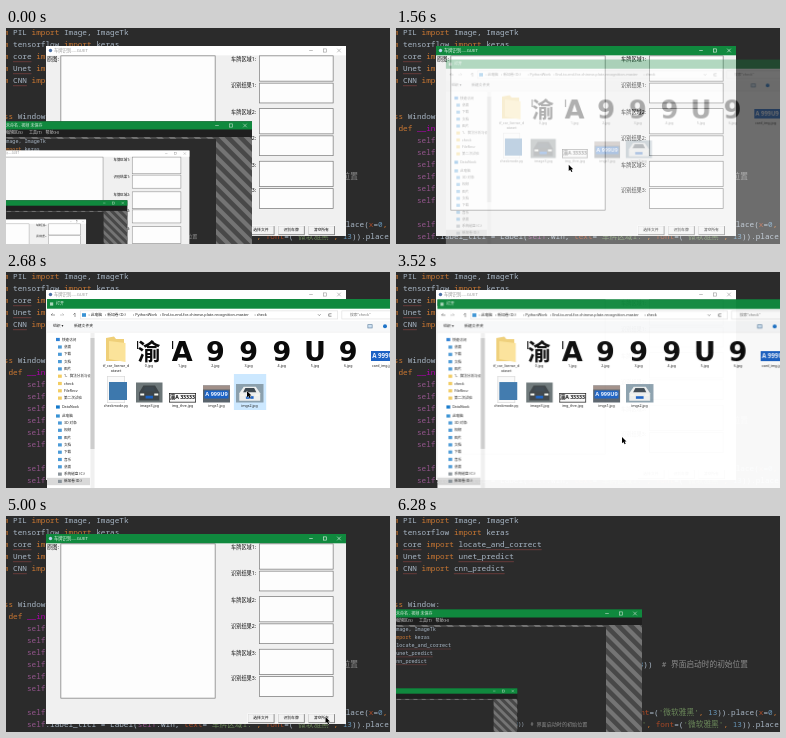
Animation, 384 px wide and 216 px high, one loop 6360 ms. Source, as an HTML page with a canvas:

```html
<!DOCTYPE html>
<html lang="zh">
<head>
<meta charset="utf-8">
<style>
html, body { margin: 0; width: 100%; height: 100%; overflow: hidden; background: #2b2b2b; }
canvas { display: block; width: 384px; height: 216px; }
</style>
</head>
<body>
<canvas id="stage" width="384" height="216"></canvas>
<script>
const LOOP = 6360;
const GREEN = '#10893e';
const UI = '"Noto Sans", "Noto Sans CJK SC", "Noto Sans CJK", sans-serif';
const MONO = '"Noto Sans Mono", "Noto Sans CJK SC", "Noto Sans CJK", monospace';
const GLYPH = '"DejaVu Sans", "Noto Sans CJK SC", "Noto Sans CJK", sans-serif';
let g = document.getElementById('stage').getContext('2d');

const clamp = v => Math.max(0, Math.min(1, v));
const easeOut = p => 1 - (1 - p) * (1 - p);
const easeIO = p => p * p * (3 - 2 * p);

function rect(x, y, w, h, color) {
  g.fillStyle = color;
  g.fillRect(x, y, w, h);
}
function box(x, y, w, h, fill, edge) {
  rect(x, y, w, h, edge);
  rect(x + 0.7, y + 0.7, w - 1.4, h - 1.4, fill);
}
function text(s, x, y, size, color, opt = {}) {
  g.font = `${opt.weight || 400} ${size}px ${opt.font || UI}`;
  g.textAlign = opt.align || 'left';
  g.textBaseline = opt.base || 'middle';
  g.fillStyle = color;
  g.fillText(s, x, y);
}
function line(points, color, width = 0.7) {
  g.strokeStyle = color;
  g.lineWidth = width;
  g.beginPath();
  points.forEach(([x, y], i) => i ? g.lineTo(x, y) : g.moveTo(x, y));
  g.stroke();
}
function poly(points, color) {
  g.fillStyle = color;
  g.beginPath();
  points.forEach(([x, y]) => g.lineTo(x, y));
  g.fill();
}
function dot(x, y, r, color) {
  g.fillStyle = color;
  g.beginPath();
  g.arc(x, y, r, 0, 7);
  g.fill();
}
function clipped(x, y, w, h, draw) {
  g.save();
  g.beginPath();
  g.rect(x, y, w, h);
  g.clip();
  draw();
  g.restore();
}

// Draws a window with opacity a, slightly shrunk around (cx, cy) while it fades.
function fade(a, cx, cy, draw) {
  if (a <= 0) return;
  if (a >= 1) return draw();
  const layer = document.createElement('canvas');
  layer.width = 410;
  layer.height = 240;
  const outer = g;
  g = layer.getContext('2d');
  draw();
  g = outer;
  const k = 0.93 + 0.07 * a;
  g.save();
  g.globalAlpha *= a;
  g.translate(cx, cy);
  g.scale(k, k);
  g.drawImage(layer, -cx, -cy);
  g.restore();
}

/* ---- editor ---- */

const INK = { w: '#a9b7c6', k: '#cc7832', s: '#94558d', m: '#b200b2', a: '#aa4926',
              t: '#6a8759', n: '#6897bb', c: '#8c8c8c' };
const CH = 4.62, SIZE = 7.7;
const label = (name, caption) =>
  `\`sself\`w.${name} = Label(\`sself\`w.win, \`atext\`w=\`t'${caption}'\`k, ` +
  `\`afont\`w=(\`t'微软雅黑'\`k, \`n13\`w)).place(\`ax\`w=\`n0\`k, `;
const CODE = [
  [0, 0, '`kfrom `wPIL `kimport `wImage, ImageTk'],
  [1, 0, '`kfrom `wtensorflow `kimport `wkeras'],
  [2, 0, '`kfrom `wcore `kimport `wlocate_and_correct'],
  [3, 0, '`kfrom `wUnet `kimport `wunet_predict'],
  [4, 0, '`kfrom `wCNN `kimport `wcnn_predict'],
  [7, 0, '`kclass `wWindow:'],
  [8, 4, '`kdef `m__init__`w(`sself`w, win):'],
  [9, 8, '`sself`w.win = win'],
  [10, 8, '`sself`w.win.title(`t"车牌识别----GUET"`w)'],
  [11, 8, '`sself`w.img_path = `kNone'],
  [12, 8, "`sself`w.win.geometry(`t'%dx%d+%d+%d'`w % (w, h, `n120`w, `n433`w))  `c# 界面启动时的初始位置"],
  [13, 8, '`sself`w.unet = `kNone'],
  [14, 8, '`sself`w.cnn = `kNone'],
  [16, 8, label('label_img', '原图:')],
  [17, 8, label('label_tici', '车牌区域1:')]
];

function codeLine(row, indent, src) {
  const y = 5 + row * 12;
  let x = -16 + indent * CH;
  for (const part of src.split('`').slice(1)) {
    for (const run of part.slice(1).match(/[\u3400-\u9fff]+|[^\u3400-\u9fff]+/g)) {
      const wide = run.charCodeAt(0) > 0x3000;
      text(run, x, y, SIZE, INK[part[0]], { font: MONO });
      x += run.length * (wide ? SIZE : CH);
    }
  }
}
function editor() {
  rect(0, 0, 384, 216, '#2b2b2b');
  CODE.forEach(l => codeLine(...l));
  [[2, 4, 18], [3, 4, 12], [4, 3, 11]].forEach(([row, a, b]) => {
    const y = 9.5 + row * 12;
    rect(7, y, a * CH, 0.6, '#8d4543');
    rect(7 + (a + 8) * CH, y, b * CH, 0.6, '#8d4543');
  });
}

/* ---- windows ---- */

function controls(x, y, gap, color) {
  line([[x - 1.8, y], [x + 1.8, y]], color, 0.6);
  g.strokeRect(x + gap - 1.6, y - 1.6, 3.2, 3.2);
  const cx = x + 2 * gap;
  line([[cx - 1.8, y - 1.8], [cx + 1.8, y + 1.8]], color, 0.6);
  line([[cx + 1.8, y - 1.8], [cx - 1.8, y + 1.8]], color, 0.6);
}

function app(active) {
  rect(40, 18, 300, 190, '#f0f0f0');
  rect(40, 18, 300, 9.3, active ? GREEN : '#fff');
  dot(44.5, 22.5, 1.7, active ? '#b9d3ee' : '#4a6fa5');
  const ink = active ? '#e8f5ec' : '#999';
  text('车牌识别----GUET', 48, 22.5, 4.3, ink);
  controls(305, 22.5, 14, ink);
  text('原图:', 41, 31.5, 5.2, '#111');
  box(54.5, 27.5, 155, 155, '#fdfdfd', '#777');
  for (let i = 0; i < 3; i++) {
    const y = i * 52.7;
    text(`车牌区域${i + 1}:`, 225, 32 + y, 5.2, '#111');
    text(`识别结果${i + 1}:`, 225, 57.5 + y, 5.2, '#111');
    box(253, 27.5 + y, 74.5, 26, '#fdfdfd', '#777');
    box(253, 54.8 + y, 74.5, 20.5, '#fdfdfd', '#777');
  }
  ['选择文件', '识别车牌', '清空所有'].forEach((s, i) => {
    const x = 241.5 + i * 30.2;
    rect(x, 197.5, 27, 9.6, '#fff');
    rect(x + 0.6, 198.1, 26.4, 9, '#777');
    rect(x + 0.6, 198.1, 25.6, 8.2, '#f2f2f2');
    text(s, x + 13.4, 202.4, 3.8, '#111', { align: 'center' });
  });
}

function recorder(t, depth) {
  rect(0, 93.3, 246, 123, '#1f1f1f');
  rect(0, 93.3, 246, 8.2, GREEN);
  text('未命名 - 视频 未保存', 0, 97.5, 4, '#d3e8da');
  controls(211, 97.5, 14, '#c4dfcd');
  text('编辑区(S)', 0, 105.2, 4, '#ccc');
  text('工具(T)', 23, 105.2, 4, '#ccc');
  text('帮助(H)', 39.5, 105.2, 4, '#ccc');

  clipped(0, 109, 246, 107, () => {
    rect(0, 109, 246, 107, '#484848');
    for (let x = -100; x < 250; x += 12.5)
      poly([[x, 109], [x + 6, 109], [x + 113, 216], [x + 107, 216]], '#747474');
  });

  if (!depth) return;
  clipped(0, 110.7, 210, 106, () => {
    g.translate(-41, 110.7);
    g.scale(0.66, 0.66);
    scene(t, depth - 1);
  });
}

/* ---- file dialog ---- */

const QUICK = ['桌面', '下载', '文档', '图片', '1、算法分析与设', 'check', 'FileRecv', '第二次试验'];
const DRIVES = ['3D 对象', '视频', '图片', '文档', '下载', '音乐', '桌面', '系统磁盘 (C:)', '新加卷 (D:)'];

function navItem(s, x, y, icon) {
  rect(x, y - 1.6, 3.8, 3.2, icon);
  text(s, x + 6, y, 3.6, '#222');
}
function nav() {
  rect(41, 205.8, 43, 7.4, '#d9d9d9');
  navItem('快速访问', 50, 67.5, '#2f82d6');
  QUICK.forEach((s, i) => navItem(s, 52, 75 + i * 7.3, i > 3 ? '#f3cd62' : '#4c9bd8'));
  navItem('DataNook', 50, 135, '#1479cc');
  navItem('此电脑', 50, 144, '#3892d4');
  DRIVES.forEach((s, i) => navItem(s, 52, 151 + i * 7.3, i > 6 ? '#8b949b' : '#4c9bd8'));
  rect(84.5, 61, 4, 160, '#f0f0f0');
  rect(84.5, 66, 4, 111, '#cdcdcd');
}

function caption(s, x, y) {
  text(s, x, y, 3.6, '#222', { align: 'center' });
}
function plate(x, y, w, h, size) {
  rect(x, y, w, h, '#1b62c4');
  text('A 999U9', x + w / 2, y + h / 2 + 0.3, size, '#eef4ff', { align: 'center', weight: 700 });
}
function car(x, y, w, h, back, body) {
  rect(x, y, w, h, back);
  const px = (u, v) => [x + u * w, y + v * h];
  poly([px(0.12, 0.9), px(0.12, 0.5), px(0.28, 0.15), px(0.72, 0.15), px(0.88, 0.5), px(0.88, 0.9)], body);
  poly([px(0.26, 0.45), px(0.34, 0.22), px(0.66, 0.22), px(0.74, 0.45)], '#3d4850');
  rect(x + w * 0.16, y + h * 0.55, w * 0.15, h * 0.1, '#f5f5ee');
  rect(x + w * 0.69, y + h * 0.55, w * 0.15, h * 0.1, '#f5f5ee');
  rect(x + w * 0.36, y + h * 0.66, w * 0.28, h * 0.14, '#1b62c4');
}

function files(selected) {
  if (selected >= 0) rect(128 + selected * 33.3, 102, 32.3, 36, '#cce8ff');

  poly([[100, 66], [108, 64.5], [110, 67], [118, 67], [118, 89], [100, 89]], '#efcf78');
  poly([[103, 69], [119.5, 71], [119.5, 90], [103, 87]], '#fbe39a');
  caption('tf_car_license_d', 110, 94);
  caption('ataset', 110, 98.5);

  [...'渝A999U9'].forEach((c, i) => {
    const x = 143 + i * 33.2;
    text(c, x, i ? 89.3 : 88, i ? 27 : 23, '#0a0a0a',
      { align: 'center', base: 'alphabetic', weight: i ? 700 : 900, font: GLYPH });
    caption(i + '.jpg', x, 94);
  });
  rect(131, 69, 1.2, 8, '#111');
  rect(166, 69, 1.2, 8, '#111');
  plate(365, 79, 27, 10, 6.2);
  caption('card_img.jpg', 377, 94);

  box(101, 104, 18, 27, '#fafafa', '#d8d8d8');
  rect(103, 110, 18, 18, '#3d78ad');
  caption('checkmode.py', 110, 134.3);
  car(130, 110.5, 26.5, 20, '#6c7678', '#3d4448');
  caption('image3.jpg', 143.5, 134.3);
  box(163, 121, 27, 9.5, '#f8f8f8', '#111');
  text('渝A 33333', 176.5, 126, 5.2, '#0a0a0a', { align: 'center', weight: 700 });
  caption('img_thre.jpg', 176.5, 134.3);
  rect(197, 113.5, 27, 17, '#59636c');
  rect(197, 113.5, 27, 4, '#a08f88');
  plate(198.5, 118.5, 24, 8, 5.6);
  caption('imgs1.jpg', 210.5, 134.3);
  car(230, 112, 27.5, 18.5, '#8ba0ad', '#eceeee');
  caption('imgs2.jpg', 243.5, 134.3);
}

function dialog(selected) {
  rect(41, 27, 369, 213, '#fff');
  rect(41, 27, 369, 9.7, GREEN);
  rect(44, 30.4, 3.2, 3.2, '#a9d6b9');
  text('打开', 50, 32, 4, '#e8f5ec');
  line([[49, 43], [45, 43], [46.7, 41.3]], '#555', 0.6);
  line([[54, 43], [58, 43], [56.3, 41.3]], '#aaa', 0.6);
  line([[69, 45], [69, 41], [67.3, 42.7]], '#555', 0.6);
  box(74, 38.5, 258, 8.8, '#fff', '#e2e2e2');
  rect(76, 41.2, 4, 3.6, '#3892d4');
  [['› 此电脑', 82.5], ['› 新加卷 (D:)', 99], ['› PythonWork', 127],
   ['› End-to-end-for-chinese-plate-recognition-master', 154], ['› check', 248.5]]
    .forEach(([s, x]) => text(s, x, 43, 3.8, '#222'));
  line([[312, 42.3], [313.3, 43.6], [314.6, 42.3]], '#555', 0.6);
  line([[325.5, 41.7], [322.7, 41.9], [322.7, 44.2], [325.5, 44.2]], '#555', 0.6);
  box(335.5, 38.5, 70, 8.8, '#fff', '#e2e2e2');
  text('搜索"check"', 344, 43, 3.8, '#777');
  rect(41, 48.8, 369, 11, '#f7f8f9');
  text('组织 ▾', 47, 54.3, 3.8, '#222');
  text('新建文件夹', 68, 54.3, 3.8, '#222');
  box(361.5, 52.3, 5, 4, '#cfe2f2', '#6a8aa8');
  dot(379, 54.3, 2, '#1f74c8');
  rect(41, 59.8, 369, 0.6, '#e8e8e8');
  nav();
  files(selected);
}

/* ---- timeline ---- */

// open, close, picked tile
const PICKS = [[980, 1450, 2], [2240, 2740, 3], [3438, 3920, 0]];
const PATH = [[400, 246, 150], [860, 255, 201], [980, 255, 201], [1260, 140, 118], [1480, 140, 118],
  [1740, 285, 201], [1980, 316, 201], [2180, 255, 201], [2500, 241, 119], [2760, 241, 119],
  [3000, 285, 201], [3220, 316, 201], [3400, 255, 201], [3520, 226, 165], [3720, 140, 118],
  [3940, 140, 118], [4240, 275, 198.5], [4640, 275, 198.5], [4940, 319.5, 201], [5180, 319.5, 201],
  [5480, 333, 23]];

function cursor(t) {
  if (t < PATH[0][0] || t > 5640) return;
  let i = PATH.findIndex(p => p[0] > t);
  if (i < 0) i = PATH.length - 1;
  const a = PATH[i - 1], b = PATH[i];
  const p = easeIO(clamp((t - a[0]) / (b[0] - a[0])));
  const x = a[1] + (b[1] - a[1]) * p, y = a[2] + (b[2] - a[2]) * p;
  const shape = [[0, 0], [0, 6.2], [1.5, 4.9], [2.6, 7.2], [3.7, 6.7], [2.6, 4.5], [4.5, 4.4]]
    .map(([u, v]) => [x + u, y + v]);
  line([...shape, shape[0]], '#fff', 0.8);
  poly(shape, '#000');
}

function scene(t, depth) {
  const recAlpha = t < 3000 ? 1 - clamp((t - 200) / 160) : easeOut(clamp((t - 5920) / 160));
  const pick = PICKS.find(([a, b]) => t >= a && t < b + 160);
  const blocked = recAlpha > 0 || (pick && t < pick[1]);
  editor();
  fade(1 - clamp((t - 5520) / 160), 190, 113, () => app(!blocked));
  if (pick) {
    const [open, close, tile] = pick;
    const a = t < close ? easeOut(clamp((t - open) / 100)) : 1 - clamp((t - close) / 160);
    fade(a, 225, 120, () => dialog(t > close - 180 && t < close ? tile : -1));
  }
  fade(recAlpha, 123, 160, () => recorder(t, depth));
  cursor(t);
}

const start = performance.now();
function frame() {
  const t = (performance.now() - start) % LOOP;
  scene(Math.floor(t / 40) * 40, 3);
  requestAnimationFrame(frame);
}
frame();
</script>
</body>
</html>
```
